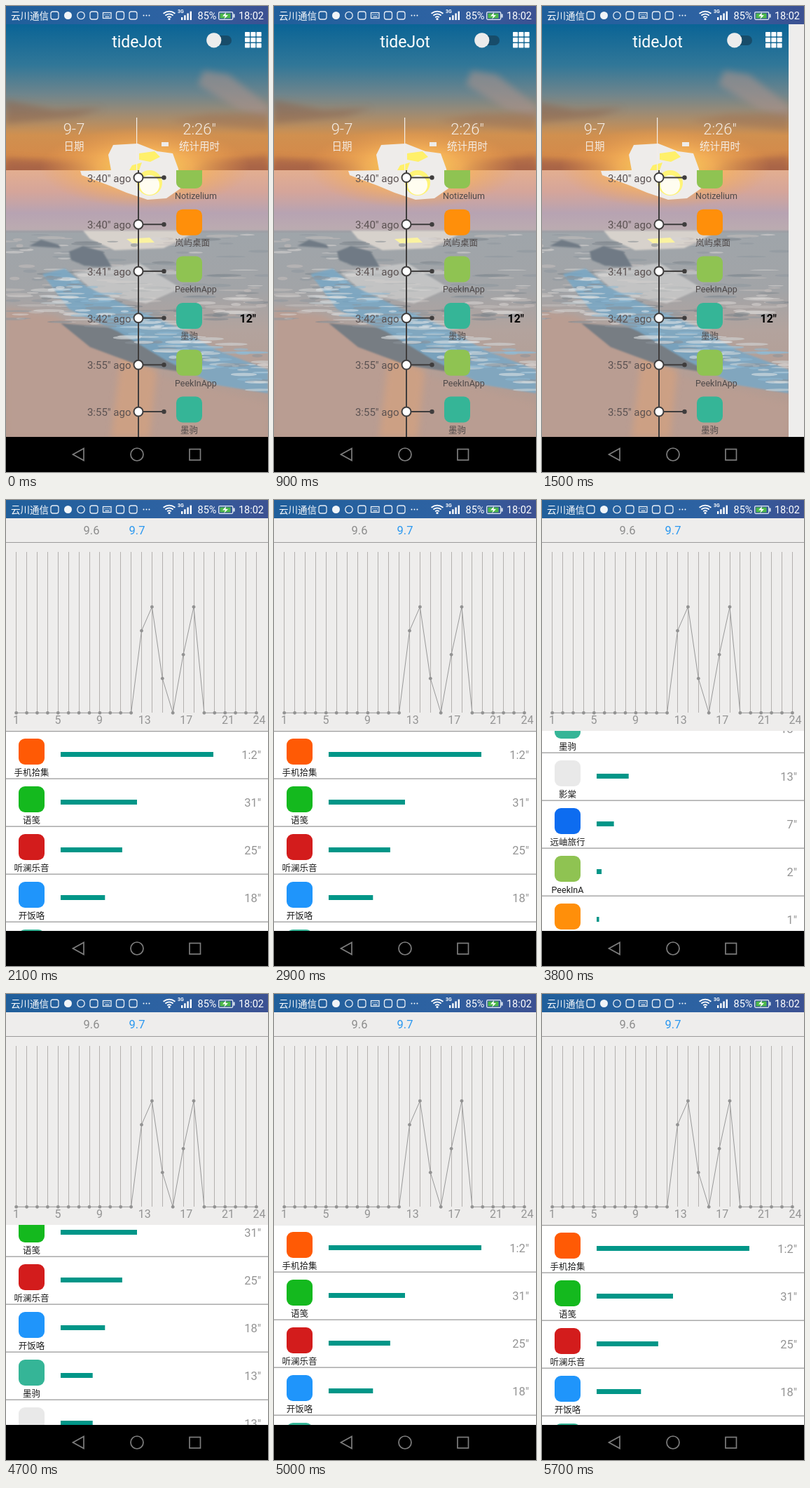
An HTML page for the animation above (6.4 s loop, 374 by 664 pixels).

```html
<!DOCTYPE html>
<html lang="zh">
<head>
<meta charset="utf-8">
<style>
html, body { margin: 0; width: 100%; height: 100%; overflow: hidden; background: #000; }
svg { display: block; width: 100vw; height: 100vh; font-family: Roboto, "Noto Sans CJK SC", "Noto Sans CJK", sans-serif; }
</style>
</head>
<body>
<svg viewBox="0 0 374 664">
  <defs>
    <linearGradient id="bar">
      <stop offset="0" stop-color="#205f9b"/><stop offset=".6" stop-color="#2d62a2"/><stop offset="1" stop-color="#3c5192"/>
    </linearGradient>
    <linearGradient id="sky" x2="0" y2="1">
      <stop offset="0" stop-color="#0a6496"/><stop offset=".28" stop-color="#317798"/>
      <stop offset=".48" stop-color="#6f858c"/><stop offset=".6" stop-color="#9a8b76"/>
      <stop offset=".76" stop-color="#d0904f"/><stop offset=".9" stop-color="#d48a4a"/><stop offset="1" stop-color="#b36c46"/>
    </linearGradient>
    <linearGradient id="sea" x2="0" y2="1">
      <stop offset="0" stop-color="#e3ae90"/><stop offset=".08" stop-color="#d5a59a"/><stop offset=".16" stop-color="#b7a3b2"/>
      <stop offset=".22" stop-color="#bbabb0"/><stop offset=".235" stop-color="#9fa5aa"/><stop offset=".45" stop-color="#a2a4a7"/>
      <stop offset=".6" stop-color="#b3a39d"/><stop offset="1" stop-color="#b4978b"/>
    </linearGradient>
    <radialGradient id="glow">
      <stop offset="0" stop-color="#ffe05a"/><stop offset=".45" stop-color="#fbb95a" stop-opacity=".8"/>
      <stop offset="1" stop-color="#f0a050" stop-opacity="0"/>
    </radialGradient>
    <filter id="soft" x="-20%" y="-20%" width="140%" height="140%"><feGaussianBlur stdDeviation="5"/></filter>
    <filter id="edge"><feGaussianBlur stdDeviation="1.2"/></filter>
    <clipPath id="page"><rect y="26" width="374" height="588"/></clipPath>
    <clipPath id="line"><rect y="234" width="374" height="380"/></clipPath>
    <clipPath id="list"><rect y="329" width="374" height="285"/></clipPath>
  </defs>
  <rect width="374" height="664"/>
  <g clip-path="url(#page)">
    <rect y="26" width="374" height="589" fill="#eeedec"/>
    <g id="home" clip-path="url(#page)"></g>
    <g id="stats"><g id="chart"></g><g clip-path="url(#list)"><rect y="329" width="374" height="286" fill="#fff"/><g id="rows"></g></g></g>
  </g>
  <g id="system"></g>
</svg>
<script>
const $ = id => document.getElementById(id);
const tag = (name, attrs, body = '') =>
  `<${name} ${Object.entries(attrs).map(([k, v]) => `${k}="${v}"`).join(' ')}>${body}</${name}>`;
const rect = (x, y, width, height, fill, more) => tag('rect', { x, y, width, height, fill, ...more });
const disc = (cx, cy, r, fill, more) => tag('circle', { cx, cy, r, fill, ...more });
const path = (d, fill, more) => tag('path', { d, fill, ...more });
const text = (s, x, y, size, fill, anchor = 'middle', more) =>
  tag('text', { x, y, 'font-size': size, fill, 'text-anchor': anchor, ...more }, s);
const tile = (x, y, fill) => rect(x, y, 37, 37, fill, { rx: 9 });

const GREEN = '#8fc352', ORANGE = '#ff8f0a', TEAL = '#35b597';

let seed = 7;
const rnd = () => (seed = seed * 16807 % 2147483647) / 2147483647;

// Flat ripples scattered around the points given by place()
function ripples(count, colors, place) {
  let s = '';
  for (let i = 0; i < count; i++) {
    const [x, y] = place(rnd()), w = 5 + rnd() * 20, h = .8 + rnd() * 1.8;
    s += tag('ellipse', { cx: x, cy: y, rx: w, ry: h, fill: colors[i % colors.length], opacity: .55 });
  }
  return s;
}

function photo() {
  const soft = { filter: 'url(#soft)' }, edge = { filter: 'url(#edge)' };
  const pale = '#eeecea', blue = '#79a8c6';
  const top = rect(0, 26, 374, 208, 'url(#sky)')
    + path('M282 92L318 98L374 142V160L330 146L274 112Z', '#a8938d', { ...soft, opacity: .6 })
    + path('M0 134L70 148L140 146L100 158L0 168Z', '#87604b', { ...soft, opacity: .5 })
    + path('M374 152L290 154L235 164L374 178Z', '#96694e', { ...soft, opacity: .4 })
    + path('M0 216L110 225L140 234L0 240ZM374 212L280 224L265 240H374Z', '#9a5946', { ...soft, opacity: .5 });
  const shore = rect(0, 234, 374, 381, 'url(#sea)')
    + path('M0 430L70 440L150 490L230 530L374 565V615H0Z', '#b99d92', soft)
    + path('M165 490L215 520L205 615H150Z', '#d9a27c', { ...soft, opacity: .6 })
    + rect(0, 320, 374, 3, '#969aa2', { opacity: .5 })
    + path('M110 320H275L225 345L155 348L120 332Z', '#e6ded5', { ...edge, opacity: .8 })
    + ripples(170, ['#d8d5d3', '#7f868d', '#c4bebc', '#8f979e'], p => [rnd() * 374, 326 + p * 125])
    + path('M33 342L50 333L75 340L78 345ZM90 350L110 342L138 350L151 372L112 370L93 362Z', '#707a85', edge)
    + path('M95 380L190 366L250 402L200 424L130 410Z', '#dedddb', { ...edge, opacity: .55 })
    + path('M78 452L150 458L245 488L255 522L190 512L120 486Z', '#777d83', edge)
    + path('M52 382L84 374L115 400L175 428L240 455L300 490L374 518V552L300 540L230 506L160 464L90 432Z', blue, { ...edge, opacity: .85 })
    + ripples(130, ['#e4e8ea', '#8a9299', '#8fbbd6', '#d5dadd'], p => [60 + p * 314, 400 + p * 130 + (rnd() - .5) * 55]);
  const sun = tag('ellipse', { cx: 198, cy: 230, rx: 150, ry: 58, fill: 'url(#glow)' })
    + path('M146 212L153 198L188 196L216 207L238 210L246 232L249 260L229 274L202 276L172 266L148 256L108 241L106 235L150 234Z', pale)
    + rect(222, 194, 10, 6, pale)
    + path('M190 210L212 207L220 215L206 222L190 219ZM180 227L194 223L190 234H176Z', '#fff06a')
    + disc(205, 252, 18, '#fff477') + disc(205, 255, 14, '#fffdf0')
    + path('M172 332L205 330L212 337L180 338Z', '#fbf3a0');
  return top + shore + sun;
}

function buildHome() {
  let grid = '';
  for (let i = 0; i < 9; i++) grid += rect(341 + i % 3 * 8.3, 37 + (i / 3 | 0) * 8, 7, 6.6, '#fff', { rx: .8 });
  const head = text('tideJot', 187, 59, 23, '#fff')
    + rect(290, 42, 32, 14, '#174c6a', { rx: 7 }) + disc(296.8, 48.8, 10.6, '#ececec') + grid
    + rect(186, 159, 1.2, 75, '#f3eee8')
    + text('9-7', 97, 183, 22, '#f4ece4', 'middle', { 'font-weight': 300 }) + text('日期', 97, 205, 14.5, '#f4ece4')
    + text('2:26"', 276, 183, 22, '#f4ece4', 'middle', { 'font-weight': 300 }) + text('统计用时', 276, 205, 14.5, '#f4ece4');
  const stops = [
    ['3:40', 'Notizelium', GREEN], ['3:40', '岚屿桌面', ORANGE], ['3:41', 'PeekInApp', GREEN],
    ['3:42', '墨驹', TEAL], ['3:55', 'PeekInApp', GREEN], ['3:55', '墨驹', TEAL]];
  const ink = '#3f3d3d';
  let line = rect(188, 234, 2, 381, ink);
  stops.forEach(([ago, app, color], i) => {
    const y = 244.5 + i * 66.7, short = app.length < 3;
    line += rect(189, y - 1, 36, 2, ink) + disc(225.5, y, 3.2, ink)
      + disc(189, y, 6.5, '#fff', { stroke: ink, 'stroke-width': 2 })
      + text(ago + '" ago', 178.5, y + 6, 15, '#5b5252', 'end')
      + tile(243, y - 21.5, color)
      + text(app, short ? 261.5 : 241, y + 30.5, 12.5, '#4f4949', short ? 'middle' : 'start');
  });
  line += text('12"', 357, 451, 16, '#000', 'end', { 'font-weight': 700 });
  $('home').innerHTML = photo() + head + tag('g', { 'clip-path': 'url(#line)' }, line);
}

function buildStats() {
  const load = { 13: 117, 14: 151, 15: 49, 17: 83, 18: 151 };
  const hx = h => 14.7 + (h - 1) * 14.9, hy = h => 303.3 - (load[h] || 0);
  let bars = '', dots = '', pts = '';
  for (let h = 1; h <= 24; h++) {
    bars += rect(Math.round(hx(h) - .5), 74, 1, 229, '#b3b0ae');
    dots += disc(hx(h), hy(h), 2.4, '#929292');
    pts += `${hx(h)},${hy(h)} `;
  }
  const labels = [1, 5, 9, 13, 17, 21, 24].map(h => text(h, hx(h) - 4.8, 318.5, 16, '#949494', 'start')).join('');
  $('chart').innerHTML = rect(0, 26, 374, 304, '#eeedec') + rect(0, 60, 374, 1, '#9b9b9b')
    + text('9.6', 122, 49, 16.5, '#8c8c8c') + text('9.7', 187, 49, 16.5, '#2b98f0')
    + bars + tag('polyline', { points: pts, fill: 'none', stroke: '#989898' }) + dots + labels;

  const apps = [
    ['手机拾集', 62, '#ff5a05'], ['语笺', 31, '#14b91e'], ['听澜乐音', 25, '#d31c1c'],
    ['开饭咯', 18, '#1f95fb'], ['墨驹', 13, TEAL], ['影棠', 13, '#e9e9e9'],
    ['远岫旅行', 7, '#0d6cf0'], ['PeekInA', 2, GREEN], ['岚屿桌面', 1, ORANGE]];
  const span = m => (m > 59 ? `${m / 60 | 0}:${m % 60}` : m) + '"';
  $('rows').innerHTML = rect(0, 329, 374, 1.2, '#9c9c9c') + apps.map(([name, min, color], i) => {
    const y = 363 + i * 68;
    return tile(18, y - 23, color) + text(name, 36.5, y + 30, 12.5, '#1c1c1c')
      + rect(78, y - 4, min * 3.516, 7, '#009688')
      + text(span(min), 364, y + 6, 16.5, '#949494', 'end')
      + rect(0, y + 33.5, 374, 1.3, '#9c9c9c');
  }).join('');
}

function buildSystem() {
  const line = { stroke: '#e6edf5', 'stroke-width': 1.3 };
  const box = x => rect(x - 5.5, 8, 11, 11, 'none', { rx: 3, ...line });
  let s = rect(0, 0, 374, 26, 'url(#bar)') + text('云川通信', 7, 19, 13.5, '#fff', 'start', { 'font-weight': 500 })
    + box(69.5) + disc(88.5, 13.5, 5.5, '#f0f4f8') + disc(107, 13.5, 5.2, 'none', line)
    + box(125.5) + rect(138.5, 9.5, 11.5, 8, 'none', line) + box(163) + box(181.5);
  for (let i = 0; i < 3; i++)
    s += rect(140.5 + i * 3, 12, 1.5, 1.2, '#e6edf5') + disc(196.5 + i * 4, 13.5, 1, '#fff');
  s += rect(141.5, 14.8, 6, 1.2, '#e6edf5');
  for (let i = 1; i < 4; i++) {
    const r = i * 3.9, w = r * .72, y = 19 - r * .7;
    s += path(`M${233 - w} ${y}Q233 ${y - r * .55} ${233 + w} ${y}`, 'none', { stroke: '#fff', 'stroke-width': 1.8 });
  }
  s += disc(233, 18.5, 1.6, '#fff') + text('3G', 245, 10, 7, '#fff', 'start', { 'font-weight': 700 });
  for (let i = 0; i < 4; i++) s += rect(250 + i * 4.2, 16 - i * 2.8, 2.4, 4 + i * 2.8, '#fff');
  s += text('85%', 273.5, 19, 14.5, '#fff', 'start') + text('18:02', 368, 19, 14.5, '#fff', 'end')
    + rect(303.7, 8.7, 20, 10.6, 'none', { rx: 1.5, ...line }) + rect(324.5, 11.5, 2, 5, '#e6edf5')
    + rect(305.5, 10.5, 15, 7, '#4cb84a') + path('M314 9L309 14.5H313L311 19L317 13H313.5Z', '#fff');
  const key = { stroke: '#7d7d7d', 'stroke-width': 1.7 };
  s += rect(0, 614, 374, 50, '#000') + path('M95.5 639L111 630.5V647.5Z', 'none', key)
    + disc(187, 639, 9, 'none', key) + rect(262, 631.5, 15.5, 15.5, 'none', key);
  $('system').innerHTML = s;
}

// Page slide: ease in and out over 240 ms
function slide(t) {
  const p = Math.min(1, Math.max(0, (t - 1463) / 240));
  return Math.round(374 * (1 - Math.cos(Math.PI * p)) / 2);
}

// Drag, then a decaying fling; one pair down and one back up
function scroll(t) {
  const mix = (a, b, p) => a + (b - a) * p;
  let y = 0;
  if (t < 3100) y = 0;
  else if (t < 3400) y = 161 * ((t - 3100) / 300) ** 1.9;
  else if (t < 4400) y = 327 - 166 * Math.exp((3400 - t) / 180);
  else if (t < 4700) y = mix(327, 91, ((t - 4400) / 300) ** 1.6);
  else if (t < 5100) y = 91 * (1 - (t - 4700) / 400) ** 3;
  return Math.round(y);
}

function draw(now) {
  const t = Math.floor(now % 6400 / 100) * 100;
  const open = t >= 1700;
  $('home').setAttribute('transform', `translate(${-slide(t)} 0)`);
  $('home').style.display = open ? 'none' : '';
  $('stats').style.display = open ? '' : 'none';
  $('rows').setAttribute('transform', `translate(0 ${-scroll(t)})`);
}

buildHome();
buildStats();
buildSystem();
const start = performance.now();
function tick() {
  draw(performance.now() - start);
  requestAnimationFrame(tick);
}
tick();
</script>
</body>
</html>
```
